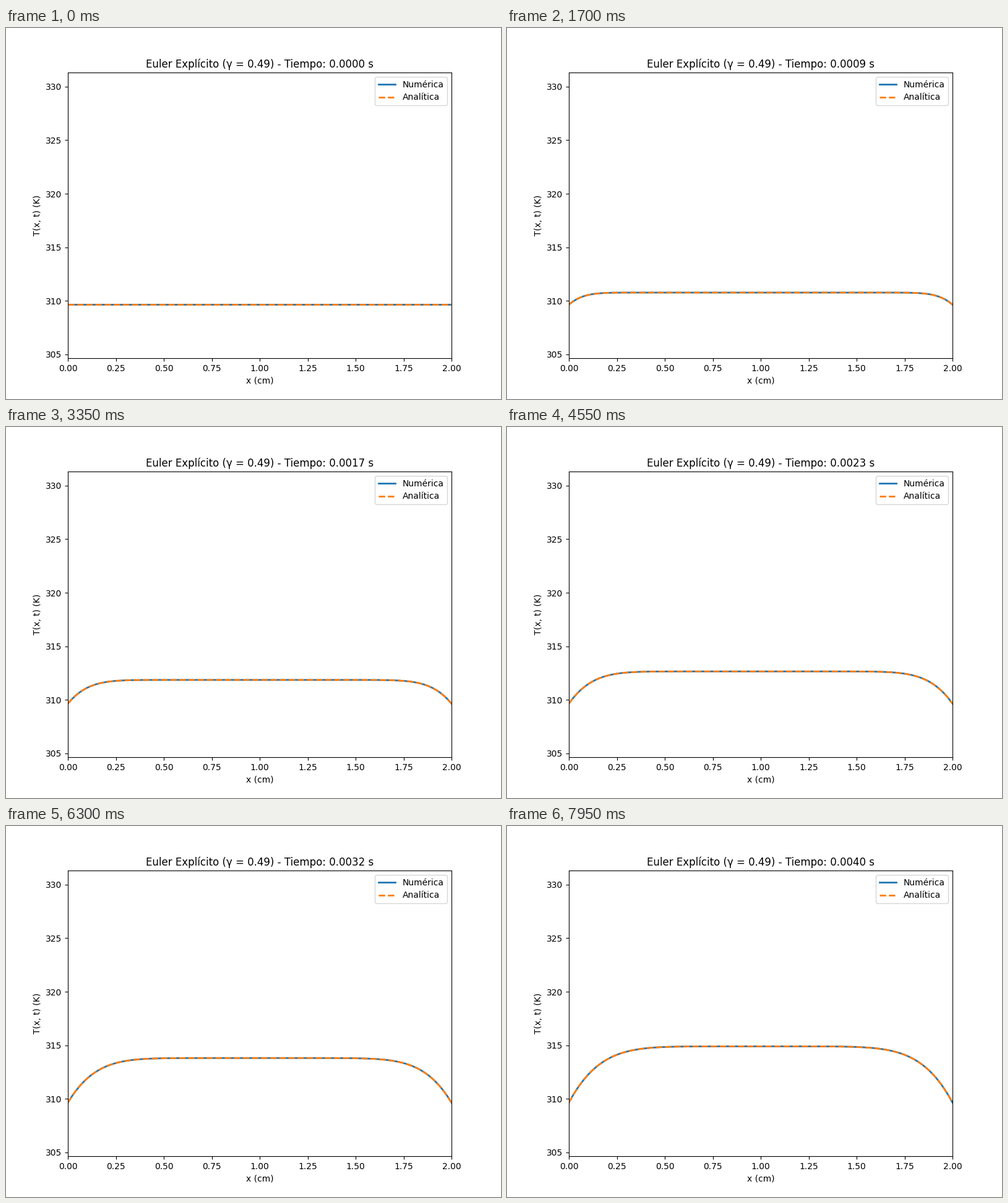
A matplotlib script for the animation above (8 s loop, 800 by 600 pixels).

```python
import numpy as np
import matplotlib.pyplot as plt
from matplotlib.animation import FuncAnimation

FRAMES, INTERVAL = 160, 50
BODY_TEMP = 309.65                         # K
SCALE = 0.472 * 40**2 / (2 * 0.56)         # K per unit of scaled temperature
END_TIME = 0.025
CELLS = 100
DX = 1 / CELLS
GAMMA = 0.49
DT = GAMMA * DX**2
CLOCK_STEP = 0.25 * DX**2                  # pace of the clock in the title

x = np.linspace(0, 1, CELLS + 1)
odd = np.arange(1, 400, 2)
modes = np.sin(np.pi * np.outer(x, odd)) * 4 / (np.pi * odd)**3


def to_kelvin(u):
    return BODY_TEMP + SCALE * u


def exact(t):
    return modes @ (1 - np.exp(-(np.pi * odd)**2 * t))


def euler(steps):
    u = np.zeros((steps, CELLS + 1))
    for n in range(steps - 1):
        bend = u[n, 2:] - 2 * u[n, 1:-1] + u[n, :-2]
        u[n + 1, 1:-1] = u[n, 1:-1] + GAMMA * bend + DT
    return u


def title_text(i):
    return f"Euler Explícito (γ = {GAMMA}) - Tiempo: {i * CLOCK_STEP:.4f} s"


numeric = to_kelvin(euler(FRAMES))

fig, ax = plt.subplots(figsize=(8, 6), dpi=100)
num_line, = ax.plot(2 * x, numeric[0], lw=2, label="Numérica")
exact_line, = ax.plot(2 * x, to_kelvin(exact(0)), "--", lw=2, label="Analítica")
ax.set_xlim(0, 2)
ax.set_ylim(BODY_TEMP - 5, to_kelvin(exact(END_TIME).max()) + 5)
ax.set_xlabel("x (cm)")
ax.set_ylabel("T(x, t) (K)")
title = ax.set_title(title_text(0))
ax.legend(loc="upper right")


def update(i):
    num_line.set_ydata(numeric[i])
    exact_line.set_ydata(to_kelvin(exact(i * DT)))
    title.set_text(title_text(i))
    return num_line, exact_line, title


anim = FuncAnimation(fig, update, frames=FRAMES, interval=INTERVAL,
                     repeat=True, repeat_delay=0, blit=False)
plt.show()
```
